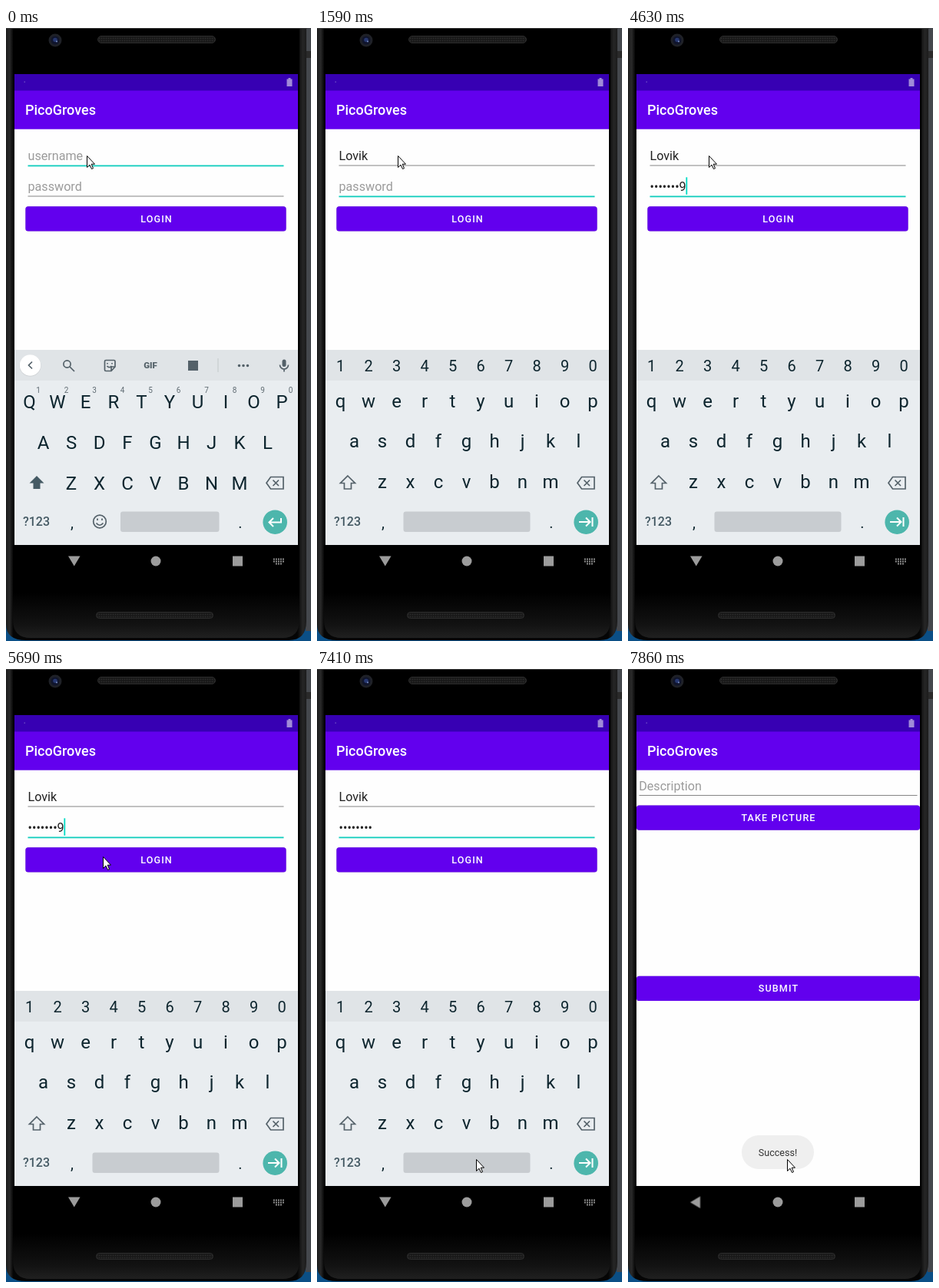
Write an HTML page that moves like this. It is 397 px wide and 798 px high and loops after 8000 ms.

```html
<!DOCTYPE html>
<html lang="en">
<head>
<meta charset="utf-8">
<title>Login demo</title>
<style>
html, body { margin: 0; width: 100%; height: 100%; overflow: hidden; background: #000; }
svg { display: block; width: 100vw; height: 100vh; font-family: Roboto, sans-serif; }
.mid { text-anchor: middle; }
.title { font-size: 18px; font-weight: 500; fill: #fff; }
.field { font-size: 16.15px; fill: #212121; white-space: pre; }
.hint { font-size: 16.15px; fill: #9b9b9b; }
.label { font-size: 12.56px; font-weight: 500; letter-spacing: 1.12px; fill: #fff; text-anchor: middle; }
.button { fill: #6200ee; filter: drop-shadow(0 .8px .7px rgba(0, 0, 0, .25)); }
.key { font-size: 24px; fill: #0d252e; text-anchor: middle; }
.digit { font-size: 20px; fill: #0d252e; text-anchor: middle; }
.sup { font-size: 10px; fill: #5f6b72; text-anchor: middle; }
.tip { font-size: 16px; fill: #24363e; text-anchor: middle; }
.icon { fill: none; stroke: #546169; stroke-width: 1.7; }
.white { fill: none; stroke: #fff; stroke-width: 2; }
#mouse, #ripple, #lift, #home, #keys, #toast, #back, #kbIcon { animation: 8s linear infinite; }
#mouse { animation-name: mouse; }
@keyframes mouse {
  0%, 63.6% { transform: translate(105px, 166px); animation-timing-function: ease-in-out; }
  68.9%, 81.4% { transform: translate(126px, 244px); animation-timing-function: ease-in-out; }
  86.9%, 100% { transform: translate(207px, 638px); }
}
#ripple { animation-name: ripple; transform-origin: 126px 244px; }
@keyframes ripple {
  0%, 72% { transform: scale(0); opacity: .16; }
  75%, 76.4% { transform: scale(1); opacity: .16; }
  76.45%, 100% { transform: scale(1); opacity: 0; }
}
#lift { animation-name: lift; }
@keyframes lift {
  0%, 72% { opacity: 0; }
  74%, 76.4% { opacity: .14; }
  76.45%, 100% { opacity: 0; }
}
#home { animation-name: home; }
@keyframes home {
  0%, 93% { transform: translateY(45px); opacity: 0; animation-timing-function: ease-out; }
  97%, 100% { transform: none; opacity: 1; }
}
#keys { animation-name: drop; }
@keyframes drop {
  0%, 93.2% { transform: none; animation-timing-function: ease-in; }
  97%, 100% { transform: translateY(254px); }
}
#toast { animation-name: toast; }
@keyframes toast { 0%, 95.5% { opacity: 0; } 98%, 100% { opacity: 1; } }
#back { animation-name: turn; transform-origin: 88px 693.5px; }
@keyframes turn { 0%, 93.5% { transform: none; } 97%, 100% { transform: rotate(90deg); } }
#kbIcon { animation-name: hide; }
@keyframes hide { 0%, 93.7% { opacity: 1; } 93.75%, 100% { opacity: 0; } }
</style>
</head>
<body>
<svg viewBox="0 0 397 798" preserveAspectRatio="none">
  <defs>
    <linearGradient id="side">
      <stop offset="0" stop-color="#1c1c1c"/><stop offset=".012" stop-color="#2a2a2a"/>
      <stop offset=".024" stop-color="#050505"/><stop offset=".97" stop-color="#050505"/>
      <stop offset=".988" stop-color="#262626"/><stop offset="1" stop-color="#1c1c1c"/>
    </linearGradient>
    <linearGradient id="chin" x2="0" y2="1">
      <stop offset="0" stop-color="#000"/><stop offset=".7" stop-color="#121212"/><stop offset="1" stop-color="#202020"/>
    </linearGradient>
    <pattern id="mesh" width="3" height="3" patternUnits="userSpaceOnUse">
      <rect width="3" height="3" fill="#191919"/><circle cx="1.5" cy="1.5" r=".8" fill="#2e2e2e"/>
    </pattern>
    <clipPath id="screen"><rect x="11" y="60" width="369" height="612.900"/></clipPath>
    <clipPath id="btn"><rect x="25.350" y="232.300" width="339.300" height="32.300" rx="3.600"/></clipPath>
    <path id="shift" d="M40 583l9.500 9.500h-5v7.500h-9v-7.500h-5z"/>
  </defs>

  <!-- phone body -->
  <rect width="397" height="798" fill="#0b4f86"/>
  <rect x="390" width="7" height="785" fill="#45484d"/>
  <path d="M0 0H391V772Q391 797 368 797H26Q0 797 0 776z" fill="url(#side)"/>
  <rect width="392" height="1" fill="#3d3d3d"/>
  <rect x="391" y="30" width="6" height="9" fill="#2a2a2a"/>
  <rect x="9" y="1" width="373" height="735" fill="#000"/>
  <path d="M9 735H382V770Q382 794 360 794H32Q9 794 9 770z" fill="url(#chin)"/>
  <circle cx="64" cy="16" r="8.500" fill="#1f2127"/>
  <circle cx="64" cy="16" r="5.500" fill="#10152c"/>
  <circle cx="64" cy="15.500" r="2.800" fill="#26376f"/>
  <circle cx="66" cy="17.500" r=".9" fill="#8ba2d6"/>
  <rect x="119.500" y="10.500" width="153" height="9" rx="4.500" fill="url(#mesh)" stroke="#2c2c2c"/>
  <rect x="117.500" y="760.500" width="152" height="8" rx="4" fill="url(#mesh)" stroke="#2c2c2c"/>

  <!-- navigation bar -->
  <g fill="#9c9c9c">
    <path id="back" d="M81 687.500h15.500l-7.750 13z"/>
    <circle cx="195" cy="694" r="6.500"/>
    <rect x="295" y="687.500" width="13" height="13"/>
    <path id="kbIcon" d="M348 691.500h14M348 694.500h14M351 697.500h8" fill="none" stroke="#9c9c9c" stroke-width="1.800" stroke-dasharray="1.800 1.200"/>
  </g>

  <g clip-path="url(#screen)">
    <rect x="11" y="60" width="369" height="613" fill="#fefefe"/>
    <g id="bar">
      <rect x="11" y="81" width="369" height="50.700" fill="#6200ee"/>
      <rect x="11" y="60" width="369" height="21.500" fill="#3700b3"/>
      <rect x="23.500" y="69.500" width="1.500" height="1.500" fill="#6a45c5"/>
      <path d="M367.500 65h3v1.500h2v9.500h-7v-9.500h2z" fill="#a08bd8"/>
      <text class="title" x="25" y="113">PicoGroves</text>
    </g>

    <text class="hint" id="userHint" x="28.500" y="172">username</text>
    <text class="field" id="user" x="28.500" y="172"></text>
    <text class="hint" id="passHint" x="28.500" y="212">password</text>
    <text class="field" id="pass" x="28.500" y="212"></text>
    <rect id="userLine" x="28.500" width="333"/>
    <rect id="passLine" x="28.500" width="333"/>
    <rect id="caret" width="1.800" height="22.500" fill="#03dac5"/>

    <rect id="lift" x="25" y="234" width="340" height="32.500" rx="4"/>
    <rect class="button" x="25.350" y="232.300" width="339.300" height="32.300" rx="3.600"/>
    <g clip-path="url(#btn)"><circle id="ripple" cx="126" cy="244" r="245" fill="#fff"/></g>
    <text class="label" x="196" y="252.900">LOGIN</text>

    <g id="home">
      <rect x="11" y="60" width="369" height="613" fill="#fefefe"/>
      <use href="#bar"/>
      <text class="hint" x="14.200" y="157.700">Description</text>
      <rect x="14.500" y="164" width="362" height="1" fill="#858585"/>
      <rect class="button" x="11" y="177.500" width="369" height="32.300" rx="3.600"/>
      <text class="label" x="196" y="198.100">TAKE PICTURE</text>
      <rect class="button" x="11" y="399.700" width="369" height="32.300" rx="3.600"/>
      <text class="label" x="196" y="420.400">SUBMIT</text>
    </g>

    <g id="keys">
      <rect x="11" y="419" width="369" height="254" fill="#e9edf0"/>
      <rect x="11" y="419" width="369" height="40" fill="#e0e4e7"/>
      <g id="strip">
        <circle cx="31.500" cy="439.500" r="14" fill="#c9cdd0"/>
        <circle cx="31.500" cy="439" r="13.700" fill="#fff"/>
        <path class="icon" d="M34 434.500l-4.500 4.500 4.500 4.500"/>
        <rect x="359.500" y="431.500" width="5" height="9.500" rx="2.500" fill="#546169"/>
        <path class="icon" d="M356.500 438.500a5.500 5.500 0 0 0 11 0M362 444v3.500"/>
      </g>
      <g id="tools">
        <circle class="icon" cx="79.500" cy="437.500" r="4.600"/>
        <path class="icon" d="M83 441l6 6"/>
        <path class="icon" d="M130 432.500h10.500q1.500 0 1.500 1.500v7l-5 5.500h-7q-1.500 0-1.500-1.500v-11q0-1.500 1.500-1.500zM142 441h-4q-1 0-1 1v4M131.500 440q3 3.500 6 0M132 436v1.500M138 436v1.500"/>
        <text class="mid" x="188" y="443" font-size="11.500" font-weight="900" fill="#546169">GIF</text>
        <rect x="237" y="433" width="13" height="13" fill="#546169"/>
        <rect x="275.500" y="430" width="1" height="18" fill="#c2c7ca"/>
        <path d="M303.500 439.500h12" fill="none" stroke="#546169" stroke-width="3.600" stroke-linecap="round" stroke-dasharray="0 5.500"/>
      </g>
      <g id="tips">
        <text class="tip" x="98" y="445"></text>
        <text class="tip" x="197" y="445" font-weight="500"></text>
        <text class="tip" x="296" y="445"></text>
        <path d="M147.500 430v18M246.500 430v18" stroke="#c2c7ca"/>
      </g>
      <g id="digits"></g>
      <g id="sups"></g>
      <g id="upper"><use href="#shift" fill="#455a64"/></g>
      <g id="lower"><use href="#shift" class="icon"/></g>
      <path class="icon" d="M344.500 584.500h16.500v15.500h-16.500l-5.500-7.750zM347.500 588.500l7.500 7.500M355 588.500l-7.500 7.500"/>
      <text class="mid" x="39.500" y="648" font-size="16" font-weight="500" fill="#455a64">?123</text>
      <text class="digit" x="86" y="651">,</text>
      <text class="digit" x="305" y="651">.</text>
      <g id="smile">
        <circle class="icon" cx="122" cy="642.500" r="8.300"/>
        <path class="icon" d="M117.500 644.500q4.500 5.500 9 0M119 638.500v2.500M125 638.500v2.500"/>
      </g>
      <rect id="space" y="629.500" height="26.500" rx="3" fill="#c8ccd0"/>
      <circle cx="350.200" cy="643.200" r="15.800" fill="#4db6ac"/>
      <path class="white" id="enter"/>
    </g>

    <g id="toast">
      <rect x="148" y="607" width="94" height="44" rx="22" fill="#efefef"/>
      <text class="mid" x="195" y="634" font-size="12.560" fill="#333">Success!</text>
    </g>
  </g>

  <path id="mouse" d="M.5 .5V15.500L4 12.200 6.500 17.500 8.500 16.600 6.200 11.200H10.500z" fill="#fff" stroke="#000" stroke-linejoin="round"/>
</svg>
<script>
const LOOP = 8000, STEP = 36.5;
const el = id => document.getElementById(id);
const show = (id, on) => { el(id).style.display = on ? '' : 'none'; };
const set = (id, attrs) => { for (const k in attrs) el(id).setAttribute(k, attrs[k]); };

function row(group, chars, cls, x, y) {
  [...chars].forEach((c, i) => {
    const t = document.createElementNS('http://www.w3.org/2000/svg', 'text');
    t.setAttribute('class', cls);
    t.setAttribute('x', x + i * STEP);
    t.setAttribute('y', y);
    t.textContent = c;
    el(group).append(t);
  });
}
row('digits', '1234567890', 'digit', 30.5, 447);
row('sups', '1234567890', 'sup', 42, 475);
[['qwertyuiop', 30.5, 495], ['asdfghjkl', 48.5, 547.5], ['zxcvbnm', 85, 600.5]].forEach(([s, x, y]) => {
  row('upper', s.toUpperCase(), 'key', x, y);
  row('lower', s, 'key', x, y - 1.5);
});

// Timelines: [start ms, value]
const name = [[0, ''], [90, 'L'], [270, 'Lo'], [460, 'Lov'], [550, 'Lovi'], [730, 'Lovik']];
const tips = [[0, ''], [180, 'Let L Look'], [270, 'Look Lo Long'], [460, 'Love Lov Lovely'],
  [550, 'Living Lovi Loving'], [730, 'Loving Lovik Look']];
const caps = [[0, 1], [180, 0], [1970, 1], [2050, 0]];
const caret = [[0, 0], [90, 1], [1590, 0], [1970, 1], [2980, 0], [3260, 1], [5180, 0], [5690, 1],
  [6120, 0], [6680, 1], [7410, 0]];
const secret = [[0, ''], [2050, 'K'], [2510, '']];
[3260, 3450, 3540, 3630, 3890, 3980, 4260, 4630].forEach((t, i) =>
  secret.push([t, '•'.repeat(i) + 'kelo2579'[i]]));
secret.push([6120, '•'.repeat(8)]);

const at = (list, t) => list.filter(e => e[0] <= t).pop()[1];

function line(id, y, focused) {
  set(id, focused ? { y: y - 0.5, height: 1.8, fill: '#10cdbd' } : { y: y - 0.5, height: 1, fill: '#858585' });
}

function draw(t) {
  const inPass = t >= 1110, passKeys = t >= 1200;
  const user = at(name, t), pass = at(secret, t), upper = at(caps, t), words = at(tips, t);
  el('user').textContent = user;
  el('pass').textContent = pass;
  show('userHint', !user);
  show('passHint', !pass);
  line('userLine', 179, !inPass);
  line('passLine', 219, inPass);
  show('caret', at(caret, t));
  set('caret', { x: 28.2 + el(inPass ? 'pass' : 'user').getComputedTextLength(), y: inPass ? 194.3 : 154.3 });

  show('upper', upper);
  show('lower', !upper);
  show('strip', !passKeys);
  show('sups', !passKeys);
  show('smile', !passKeys);
  show('digits', passKeys);
  show('tools', !passKeys && !words);
  show('tips', !passKeys && words);
  const w = words.split(' ');
  el('tips').querySelectorAll('text').forEach((n, i) => { n.textContent = w[i] || ''; });
  set('space', passKeys ? { x: 112.5, width: 165 } : { x: 149, width: 128.5 });
  set('enter', { d: passKeys ? 'M341 643h14M350 637.5l5.5 5.5-5.5 5.5M358.5 637v12'
    : 'M358 638v5.5h-15M348 638l-5.5 5.5 5.5 5.5' });
}

let start;
function tick(now) {
  start ??= now;
  draw((now - start) % LOOP);
  requestAnimationFrame(tick);
}
draw(0);
requestAnimationFrame(tick);
</script>
</body>
</html>
```
